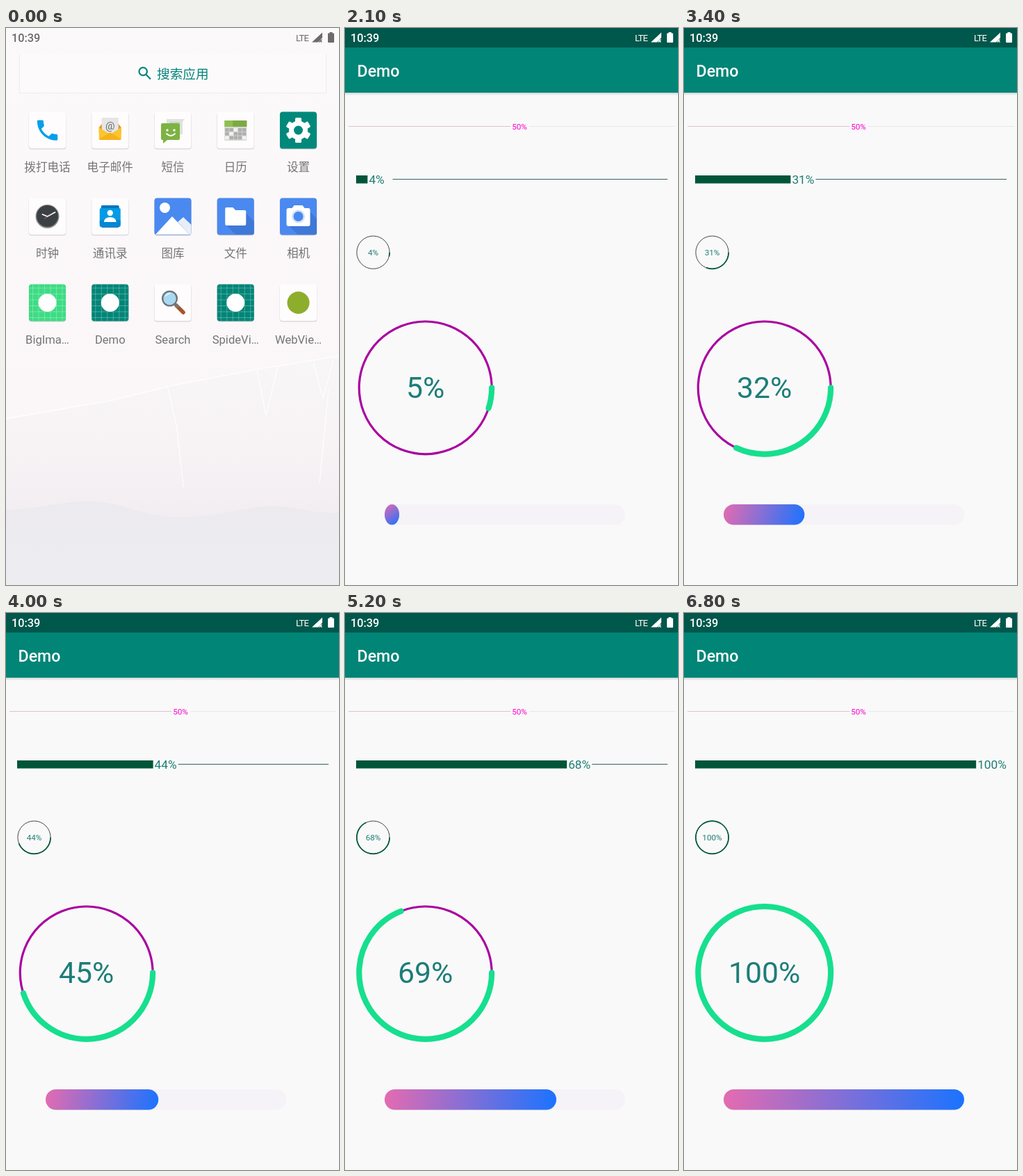
An HTML page for the animation above (7400 ms loop, 479 by 801 pixels).

```html
<!DOCTYPE html>
<html lang="zh-CN">
<head>
<meta charset="utf-8">
<style>
html, body { margin: 0; width: 100%; height: 100%; overflow: hidden; background: #f9f9f9; }
svg { display: block; width: 479px; height: 801px; font-family: Roboto, "Noto Sans CJK SC", sans-serif; }
.label { font-size: 16.6px; fill: #757575; text-anchor: middle; }
.mid { text-anchor: middle; }
</style>
</head>
<body>
<svg viewBox="0 0 479 801">
  <defs>
    <linearGradient id="sky" x2="0" y2="1">
      <stop offset="0" stop-color="#fcf9fa"/><stop offset=".7" stop-color="#fbf7f8"/><stop offset="1" stop-color="#f4eff2"/>
    </linearGradient>
    <linearGradient id="slope" x2="0" y2="1">
      <stop offset="0" stop-color="#f9f6f7"/><stop offset=".4" stop-color="#f7f3f5"/><stop offset=".75" stop-color="#f1ecf0"/>
    </linearGradient>
    <linearGradient id="hill" x2="0" y2="1">
      <stop offset="0" stop-color="#eceaee"/><stop offset="1" stop-color="#ededf1"/>
    </linearGradient>
    <linearGradient id="fade" gradientUnits="userSpaceOnUse" x1="57" y1="685" x2="403" y2="714">
      <stop offset="0" stop-color="#e56bb0"/><stop offset="1" stop-color="#1a73ff"/>
    </linearGradient>
    <linearGradient id="shade" x2="0" y2="1">
      <stop offset="0" stop-color="#cfd4d3"/><stop offset="1" stop-color="#f9f9f9"/>
    </linearGradient>
  </defs>

  <g id="home">
    <rect width="479" height="801" fill="url(#sky)"/>
    <path d="M0 562L150 536 240 514 360 491 479 472V801H0z" fill="url(#slope)"/>
    <g fill="none" stroke="#fff" stroke-opacity=".75" stroke-width="1.5">
      <path d="M0 562L150 536 240 514 360 491 479 472M232 514L246 575 255 660M361 491L374 557 391 487M442 482L456 532 471 478M464 520L451 655"/>
    </g>
    <path d="M0 693C50 692 90 678 130 681S190 700 240 703 340 690 375 688 440 699 479 697V801H0z" fill="url(#hill)"/>
    <path d="M19.5 38V93.500H460.500V38" fill="#fdfafb" stroke="#efebed"/>
    <g fill="none" stroke="#00857a" stroke-width="2.200">
      <circle cx="197.200" cy="62.500" r="5.700"/><path d="M201.500 67L208 73.500"/>
    </g>
    <text x="217" y="72.500" font-size="18.700" fill="#00857a">搜索应用</text>
    <g id="apps"></g>
  </g>

  <g id="demo">
    <rect width="479" height="801" fill="#f9f9f9"/>
    <rect y="93" width="479" height="4" fill="url(#shade)"/>
    <rect y="27" width="479" height="66" fill="#008577"/>
    <rect width="479" height="28" fill="#00574b"/>
    <text x="17.500" y="70" font-size="23.200" font-weight="500" fill="#fff">Demo</text>

    <path d="M5 141.500H238" stroke="#e6bdd4"/>
    <path d="M265 141.500H475" stroke="#e8e8e8"/>
    <text class="mid" x="251" y="145.500" font-size="11.700" fill="#f0c">50%</text>

    <path id="rest" stroke="#3b6160"/>
    <rect id="bar" x="16" y="212" height="11.500" fill="#005539"/>
    <text id="barText" y="223.600" font-size="17.300" fill="#1d7d74"></text>

    <g fill="none">
      <circle cx="40.500" cy="322.700" r="23.600" stroke="#333" stroke-width=".9"/>
      <circle id="ring" cx="40.500" cy="322.700" r="23.600" stroke="#00573b" stroke-width="1.700" pathLength="100"/>
      <circle cx="115.700" cy="517.400" r="95.400" stroke="#aa00a0" stroke-width="3.200"/>
      <circle id="bigRing" cx="115.700" cy="517.400" r="95.400" stroke="#16df8e" stroke-width="8.200" stroke-linecap="round" pathLength="100"/>
    </g>
    <text id="ringText" class="mid" x="40.500" y="326.800" font-size="11.700" fill="#237d75"></text>
    <text id="bigText" class="mid" x="115.700" y="532.300" font-size="42.700" fill="#1d7d78"></text>

    <rect x="57" y="685" width="346" height="29.500" rx="14.750" fill="#f5f3f7"/>
    <rect id="pill" x="57" y="685" height="29.500" rx="14.750" fill="url(#fade)"/>
  </g>

  <g id="status">
    <text x="8" y="20" font-size="16.300" font-weight="500">10:39</text>
    <text x="417" y="19" font-size="13" letter-spacing="-.7">LTE</text>
    <path d="M440 20.500L455 6.500V14L449 20.500z"/>
    <path d="M450.500 16.500L454.500 20.500M454.500 16.500L450.500 20.500" stroke-width="1.300"/>
    <path d="M463 8.500Q463 7.500 464 7.500H465.500V6H469.500V7.500H471Q472 7.500 472 8.500V20Q472 21 471 21H464Q463 21 463 20z"/>
  </g>
</svg>
<script>
const $ = id => document.getElementById(id);

// Icon art is centred on 0,0 inside a 53px tile.
const disc = (x, y, r, fill) => `<circle cx="${x}" cy="${y}" r="${r}" fill="${fill}"/>`;
const box = (x, y, w, h, fill, rx = 0) => `<rect x="${x}" y="${y}" width="${w}" height="${h}" rx="${rx}" fill="${fill}"/>`;
const shape = (d, fill) => `<path d="${d}" fill="${fill}"/>`;
const line = (d, stroke, w) => `<path d="${d}" fill="none" stroke="${stroke}" stroke-width="${w}" stroke-linecap="round"/>`;

let grid = "";
for (let i = -21; i < 26; i += 8.5) grid += `M${i} -26V26M-26 ${i}H26`;
const gridArt = line(grid, "#ffffff66", .7) + disc(0, 0, 13, "#fff");

let cells = "";
for (let i = 0; i < 15; i++)
  cells += box(-15 + i % 5 * 6.2, -3 + (i / 5 | 0) * 5.7, 5.4, 4.9, i % 4 == 2 ? "#f2f2f2" : "#aeb0ae");

let teeth = "";
for (let i = 0; i < 6; i++)
  teeth += `<rect x="-4.5" y="-18" width="9" height="12" rx="1.5" fill="#fff" transform="rotate(${i * 60})"/>`;

const WHITE = "#fefcfd", TEAL = "#00897b", BLUE = "#4a89f0";
const apps = [
  ["拨打电话", WHITE, `<path transform="translate(-19.5 -19.5) scale(1.63)" fill="#03a0ea" d="M6.62 10.79c1.44 2.83 3.76 5.14 6.59 6.59l2.2-2.2c.27-.27.67-.36 1.02-.24 1.12.37 2.33.57 3.57.57.55 0 1 .45 1 1V20c0 .55-.45 1-1 1-9.39 0-17-7.61-17-17 0-.55.45-1 1-1h3.5c.55 0 1 .45 1 1 0 1.25.2 2.45.57 3.57.11.35.03.74-.25 1.02l-2.2 2.2z"/>`],
  ["电子邮件", WHITE, shape("M-16-4L-12-9H12L16-4V4H-16z", "#e09a20") + box(-12, -18, 24, 24, "#e6e6e6", 1)
    + `<text class="mid" y="-1" font-size="15" fill="#6b6b6b">@</text>`
    + shape("M-16-4L0 6 16-4V12Q16 14 14 14H-14Q-16 14-16 12z", "#fbc52d") + shape("M-16 13L0 3 16 13 14 14H-14z", "#f5b21c")],
  ["短信", WHITE, shape("M-9-16H17L14-12V6H-9z", "#dfe3dc") + line("M-4-11H10M-4-7H10", "#c4cbc0", 1.500)
    + shape("M-15-10H8Q10-10 10-8V12Q10 14 8 14H-8L-14 19V14Q-17 14-17 12V-8Q-17-10-15-10z", "#7cb342")
    + disc(-8, 0, 1.700, "#fff") + disc(2, 0, 1.700, "#fff") + line("M-9 5Q-3 11 3 5", "#fff", 1.800)],
  ["日历", WHITE, box(-16, -14, 32, 29, "#d8dad6", 1) + box(-16, -14, 32, 9, "#8fbf4d")
    + box(-4, -14, 20, 9, "#7da942") + cells],
  ["设置", TEAL, teeth + disc(0, 0, 13.500, "#fff") + disc(0, 0, 6.500, TEAL)],
  ["时钟", WHITE, disc(0, 0, 17, "#8a8a8a") + disc(0, -.5, 15.500, "#3b4044") + line("M0 0L-7-3M0 0L11-6", "#fff", 1.800)
    + line("M-4 3L8-5", "#d0a080", .6)],
  ["通讯录", WHITE, box(-13, -16, 26, 32, "#0277bd", 2) + box(-15, -12, 30, 24, "#039be5", 2)
    + box(-15, 5, 30, 10, "#0288d1", 2) + disc(0, -5, 4.200, "#fff") + shape("M-9 8Q-8 1 0 1T9 8z", "#fff")],
  ["图库", BLUE, disc(-11.500, -12.500, 7.500, "#fff") + shape("M-25 26L-1 0 24 26z", "#fff")
    + shape("M7 8L15 1 26.500 12V24Q26.500 26 24 26z", "#e9eef6")],
  ["文件", BLUE, shape("M-14 12L0 26H24Q26.500 26 26.500 24V7L15-5z", "#3f78d8")
    + shape("M-13-13H-4L0-9H13Q15-9 15-7V11Q15 13 13 13H-13Q-15 13-15 11V-11Q-15-13-13-13z", "#fff")],
  ["相机", BLUE, shape("M-15 12L-1 26H24Q26.500 26 26.500 24V4L16-8z", "#3f78d8")
    + shape("M-6-16H6L9-12H14Q17-12 17-9V11Q17 14 14 14H-14Q-17 14-17 11V-9Q-17-12-14-12H-9z", "#fff")
    + disc(0, 0, 9.500, "#d3e0f6") + disc(0, 0, 7, BLUE)],
  ["BigIma…", "#3ddc84", gridArt],
  ["Demo", "#008577", gridArt],
  ["Search", WHITE, line("M5 4L15 14", "#a6542a", 5.500) + line("M4 3L7 6", "#777", 4)
    + disc(-4.500, -6, 11.500, "#6d7478") + disc(-4.500, -6, 9.200, "#a9d8f2") + shape("M-12-8Q-9-15-2-14Q-8-11-12-8z", "#e9f7ff")],
  ["SpideVi…", "#008577", gridArt],
  ["WebVie…", WHITE, disc(0, 0, 16, "#8dae2c")]
];
$("apps").innerHTML = apps.map(([name, fill, art], i) => {
  const x = 59.5 + i % 5 * 90.25, y = 147 + (i / 5 | 0) * 124;
  return `<g id="app${i}" transform="translate(${x} ${y})">${box(-27, -25.5, 54, 53, "#00000018", 4)}`
    + `${box(-26.5, -25, 53, 52.3, "#00000022", 4)}${box(-26.5, -26.5, 53, 53, fill, 4)}${art}</g>`
    + `<text class="label" x="${x}" y="${y + 59}">${name}</text>`;
}).join("");

// Progress is uneven, so it is interpolated between [ms, percent] points.
const points = [[2000, 2.6], [2800, 19], [3500, 33], [4000, 44], [4300, 50], [5100, 67], [5200, 68], [5900, 83], [6700, 99], [6800, 100]];
function percent(t) {
  const i = points.findIndex(p => p[0] > t);
  if (i < 0) return 100;
  const [t0, a] = points[i - 1], [t1, b] = points[i];
  return Math.floor(a + (b - a) * (t - t0) / (t1 - t0) + 1e-6);
}

function drawProgress(p) {
  const big = Math.min(p + 1, 100);
  const textWidth = 17.3 * (p < 100 ? 1.857 : 2.418);
  const x = Math.min(16.5 + 4.48 * p, 464 - textWidth);
  const end = x + textWidth + 2;
  $("bar").setAttribute("width", x - 18);
  $("barText").setAttribute("x", x);
  $("rest").setAttribute("d", end < 464 ? `M${end} 217.500H464` : "");
  $("ring").setAttribute("stroke-dasharray", `${p} 100`);
  $("bigRing").setAttribute("stroke-dasharray", `${big} 100`);
  $("barText").textContent = $("ringText").textContent = p + "%";
  $("bigText").textContent = big + "%";
  const w = Math.min(3.53 * big + 3.4, 346);
  $("pill").setAttribute("width", w);
  $("fade").setAttribute("x2", 57 + w);
}

function frame(now) {
  const t = Math.floor(now % 7400 / 100) * 100;
  const open = t >= 2000;
  $("home").style.display = open ? "none" : "";
  $("demo").style.display = open ? "" : "none";
  const color = open ? "#fff" : t < 1800 ? "#6b6b6b" : "#a6a6a6";
  $("status").setAttribute("fill", color);
  $("status").setAttribute("stroke", "none");
  $("status").querySelector("[stroke-width]").setAttribute("stroke", color);
  const scale = t < 1000 ? 1 : t < 1100 ? 1.05 : 1.1;
  $("app11").setAttribute("transform", `translate(149.75 395) scale(${scale})`);
  if (open) drawProgress(percent(t));
}

const start = performance.now();
function loop() {
  frame(performance.now() - start);
  requestAnimationFrame(loop);
}
loop();
</script>
</body>
</html>
```
